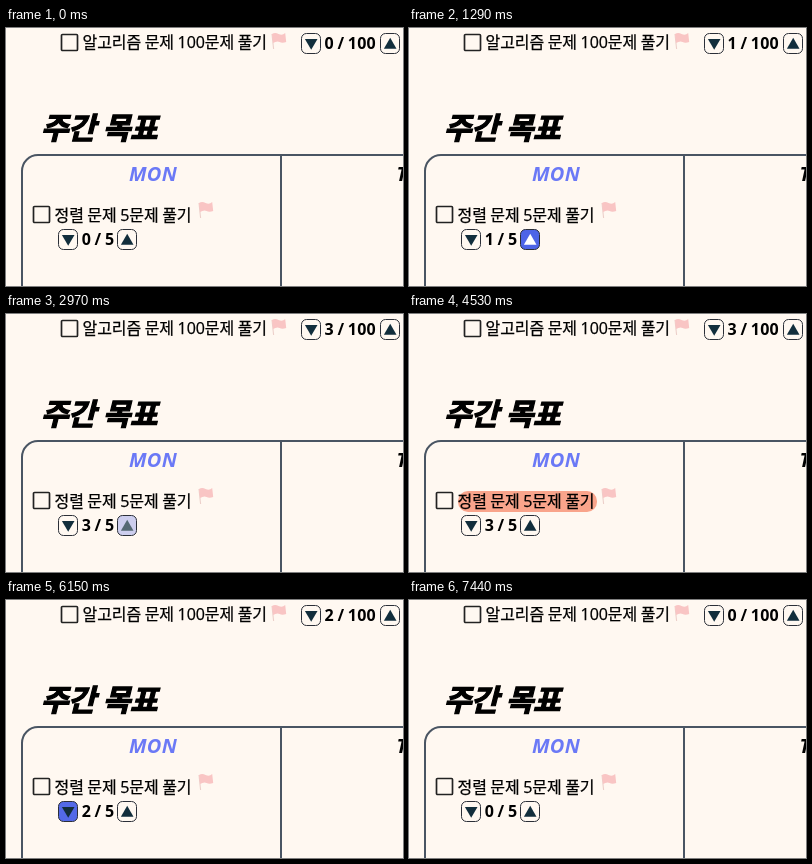
An HTML page for the animation above (7920 ms loop, 397x258 px).

```html
<!DOCTYPE html>
<html lang="ko">
<head>
<meta charset="utf-8">
<style>
  html, body { margin: 0; width: 100%; height: 100%; overflow: hidden; background: #fff8f1; }
  svg { display: block; width: 100%; height: 100%; }
  text { font: 700 16px "Open Sans", "Noto Sans CJK KR", sans-serif; white-space: pre; }
  .task { font-weight: 500; word-spacing: -.6px; letter-spacing: -.05px; stroke: #000; stroke-width: .25; }
  .count { word-spacing: -1px; letter-spacing: .3px; }
  .day { font-size: 20px; font-style: italic; letter-spacing: .3px; }
  .heading { font: italic 900 30px "Noto Sans CJK KR", sans-serif; letter-spacing: -.4px; word-spacing: -.5px; stroke: #000; stroke-width: 1.2; }
  .line { fill: none; stroke: #4a5563; stroke-width: 2; }
  .box { fill: none; stroke: #222; stroke-width: 1.7; }
  .frame { stroke: #2b2f38; }
</style>
</head>
<body>
<svg viewBox="0 0 397 258">
  <defs>
    <rect id="check" class="box" width="16" height="16" rx="1"/>
    <g id="flag">
      <path d="M1 2L2.6 17" stroke="#eccfca" stroke-width="1.1"/>
      <path d="M1 2q3-2 6.6 0t6.6-1l1 9q-4 1.5-6.6 0t-6.6 1z" fill="#f9c5c4"/>
    </g>
  </defs>

  <use href="#check" x="55.5" y="6.5"/>
  <text class="task" x="76.5" y="20">알고리즘 문제 100문제 풀기</text>
  <use href="#flag" x="265" y="4"/>
  <text class="count" x="318.5" y="21" data-goal="100"></text>

  <text class="heading" x="34.8" y="110.8">주간 목표</text>
  <rect class="line" x="16" y="127" width="600" height="300" rx="16"/>
  <path class="line" d="M275 127V300"/>
  <text class="day" x="147" y="153" text-anchor="middle" fill="#6b79f6">MON</text>
  <text class="day" x="390.5" y="153">TUE</text>

  <rect id="mark" x="49" y="177" width="139" height="21" rx="10" fill="#f9a48b"/>
  <use href="#check" x="27.5" y="178.5"/>
  <text class="task" x="48.5" y="193">정렬 문제 5문제 풀기</text>
  <use href="#flag" x="192" y="173"/>
  <text class="count" x="75.7" y="217" data-goal="5"></text>
</svg>
<script>
const LOOP = 7920, FADE = 220;
const CREAM = [255, 248, 241], BLUE = [77, 100, 231], INK = [18, 46, 60], WHITE = [255, 255, 255];
const svg = document.querySelector('svg');
const mark = document.getElementById('mark');
const counts = document.querySelectorAll('.count');

// [time, target]: the hover fill fades out on press and back in on release
const upHover = [[680, 1], [895, 0], [1060, 1], [1765, 0], [1905, 1], [2755, 0], [2930, 1], [3440, 0]];
const downHover = [[4555, 1], [4590, 0], [5060, 1], [5390, 0], [5565, 1],
  [6140, 0], [6350, 1], [6800, 0], [6980, 1], [7215, 0]];
const clicks = [[1060, 1], [1905, 1], [2930, 1], [5565, -1], [6350, -1], [6980, -1]];

function add(parent, tag, attrs) {
  const el = document.createElementNS(svg.namespaceURI, tag);
  for (const key in attrs) el.setAttribute(key, attrs[key]);
  return parent.appendChild(el);
}

function button(x, y, up) {
  const g = add(svg, 'g', { transform: `translate(${x} ${y})` });
  const face = add(g, 'rect', { class: 'frame', x: .5, y: .5, width: 19, height: 20, rx: 5 });
  const arrow = add(g, 'path', { d: up ? 'M3.9 15.8h12.6L10.2 4.8z' : 'M3.9 5.9h12.6L10.2 16.7z' });
  return h => {
    face.style.fill = mix(CREAM, BLUE, h);
    arrow.style.fill = mix(INK, WHITE, up ? h : 0);
  };
}

const mix = (a, b, k) => `rgb(${a.map((v, i) => Math.round(v + (b[i] - v) * k))})`;

// CSS "ease": cubic-bezier(.25, .1, .25, 1)
function ease(x) {
  if (x <= 0 || x >= 1) return x <= 0 ? 0 : 1;
  let lo = 0, hi = 1, s = .5;
  for (let i = 0; i < 16; i++) {
    s = (lo + hi) / 2;
    if (.75 * s * (1 - s) + s ** 3 < x) lo = s; else hi = s;
  }
  return .3 * s * (1 - s) ** 2 + 3 * s * s * (1 - s) + s ** 3;
}

function hover(events, t) {
  let value = 0;
  events.forEach(([start, target], i) => {
    if (t < start) return;
    const end = Math.min(t, i + 1 < events.length ? events[i + 1][0] : t);
    value += (target - value) * ease((end - start) / FADE);
  });
  return value;
}

button(295, 5, false)(0);
button(374, 5, true)(0);
const down = button(52, 201, false);
const up = button(111, 201, true);

function draw() {
  const t = performance.now() % LOOP;
  const n = clicks.reduce((sum, [at, step]) => sum + (t >= at ? step : 0), 0);
  counts.forEach(el => { el.textContent = `${n} / ${el.dataset.goal}`; });
  const marked = [300, 4530].some(at => t >= at && t < at + 30);
  mark.style.visibility = marked ? 'visible' : 'hidden';
  up(hover(upHover, t));
  down(hover(downHover, t));
  requestAnimationFrame(draw);
}
draw();
</script>
</body>
</html>
```
